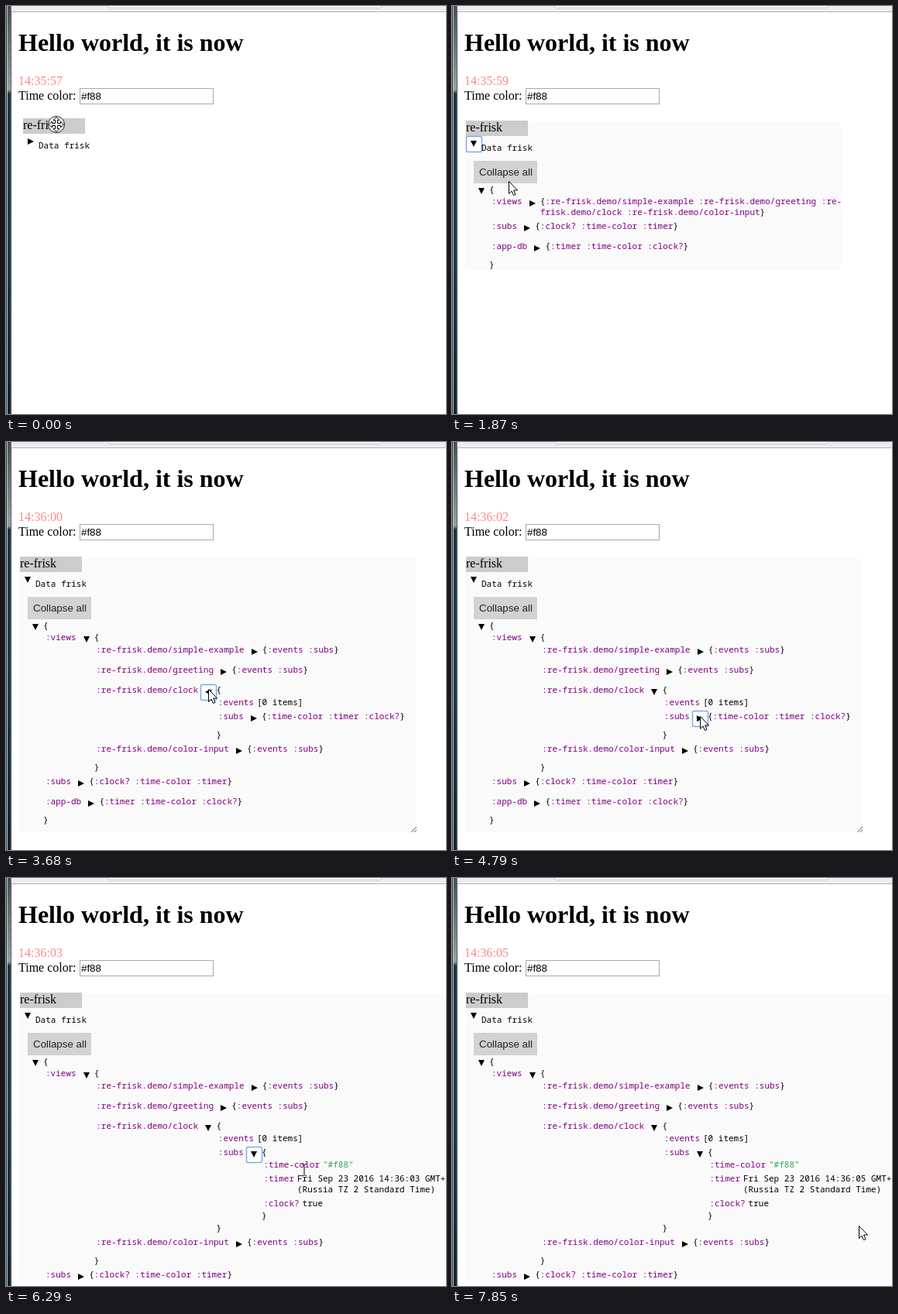
An HTML page that plays this animation: 568x527 px, repeating every 8 s.

```html
<!DOCTYPE html>
<html lang="en">
<head>
<meta charset="utf-8">
<title>Data inspector</title>
<style>
  html, body { margin: 0; width: 100%; height: 100%; overflow: hidden; background: #fff; }
  svg { display: block; }
  text { white-space: pre; }
  .mono { font: 11px "Noto Sans Mono", "DejaVu Sans Mono", monospace; }
  .serif { font: 16px "Liberation Serif", "Times New Roman", serif; }
  .head { font: bold 32px "Liberation Serif", "Times New Roman", serif; }
  .sans { font: 13.33px "Liberation Sans", Arial, sans-serif; }
  .key { fill: #800080; }
  .str { fill: #2fa350; }
</style>
</head>
<body>
<svg width="568" height="527" viewBox="0 0 568 527">
  <defs>
    <linearGradient id="edge" x1="0" y1="0" x2="0" y2="1">
      <stop offset="0" stop-color="#4d4f51"/>
      <stop offset=".1" stop-color="#6f7376"/>
      <stop offset=".205" stop-color="#9a9ea0"/>
      <stop offset=".215" stop-color="#20343d"/>
      <stop offset=".55" stop-color="#203c49"/>
      <stop offset="1" stop-color="#16242c"/>
    </linearGradient>
  </defs>
  <rect x="7" width="561" height="7" fill="#ededed"/>
  <rect x="7" y="7" width="561" height="1" fill="#b4b4b4"/>
  <rect x="132.5" y="-6.5" width="352" height="9" rx="2" fill="#fff" stroke="#c4c4c4"/>
  <rect width="7" height="527" fill="url(#edge)"/>
  <rect width="1" height="527" fill="#20343d"/>
  <rect x="1" width="1" height="527" fill="#c8ced1"/>
  <rect x="6" width="1" height="527" fill="#5d7079"/>
  <rect x="7" y="8" width="1" height="519" fill="#d5dde0"/>
  <g id="panel"></g>
  <text class="head" x="16" y="58">Hello world, it is now</text>
  <text class="serif" id="clock" x="16" y="102" fill="#f88"></text>
  <text class="serif" x="16" y="121">Time color:</text>
  <rect x="95.5" y="106.5" width="172" height="20" fill="#fff" stroke="#a9a9a9"/>
  <text class="sans" x="97" y="121">#f88</text>
  <g id="tree"></g>
  <g id="cursor"></g>
</svg>
<script>
const LOOP = 8000, CW = 6.6, SPIN = 200;
const el = id => document.getElementById(id);

// Screen refreshes: [first, last, count], evenly spread.
const ticks = [0];
for (const [a, b, n] of [[120, 1060, 8], [1210, 2170, 8], [2330, 2480, 2], [2760, 3680, 8],
  [3830, 4790, 8], [4910, 5900, 8], [6020, 6290, 3], [6430, 7010, 5], [7170, 7850, 6]])
  for (let i = 0; i < n; i++) ticks.push(a + (b - a) * i / (n - 1));

// Click time of each expander.
const click = { data: 1000, views: 2290, clock: 3552, subs: 4788 };
const BLUR = 7300;

// Pointer path: time, x, y, shape.
const path = [
  [0, 65, 153, 'move'], [120, 65, 153, 'move'], [390, 61, 156, 'move'],
  [600, 50, 160, 'arrow'], [920, 22, 180, 'arrow'], [1260, 22, 180, 'arrow'],
  [1620, 60, 216, 'arrow'], [2100, 106, 251, 'arrow'], [2760, 106, 251, 'arrow'],
  [3150, 190, 290, 'arrow'], [3540, 261, 319, 'arrow'], [3900, 261, 319, 'arrow'],
  [4500, 318, 350, 'arrow'], [4700, 320, 354, 'arrow'], [4950, 320, 354, 'arrow'],
  [5250, 352, 366, 'beam'], [5600, 385, 377, 'beam'], [6400, 385, 377, 'beam'],
  [6570, 430, 392, 'beam'], [6720, 490, 406, 'arrow'], [7010, 523, 411, 'arrow'],
  [7170, 528, 424, 'arrow'], [7450, 533, 448, 'arrow'], [7700, 525, 449, 'arrow'],
  [LOOP, 525, 449, 'arrow']];

const shapes = {
  arrow: '<path d="M.5 .5V16.5L4 13L6.5 18.5L9 17.5L6.6 12H11.5Z" fill="#fff" stroke="#000"/>',
  beam: '<path d="M-3 -7.5H-1L0 -6.5L1 -7.5H3M0 -6.5V6.5M-3 7.5H-1L0 6.5L1 7.5H3" fill="none" stroke="#000"/>',
  move: '<circle r="10.5" fill="#fff" stroke="#222"/>' + [0, 90, 180, 270].map(a =>
    `<path transform="rotate(${a})" d="M-1.5 -1.5V-5.5H-4L0 -9.5L4 -5.5H1.5V-1.5" fill="#fff" stroke="#000"/>`).join('')
};

const NS = 're-frisk.demo/', EV = ['events', 'subs'];
const view = (name, more) => ({ key: NS + name, keys: EV, ...more });
const clockText = t => {
  const s = 57 + Math.floor((t + 280) / 1000);
  return `14:${35 + Math.floor(s / 60)}:${String(s % 60).padStart(2, '0')}`;
};

const model = time => [
  {
    key: 'views', id: 'views',
    lines: [`{:${NS}simple-example :${NS}greeting :re-`, 'frisk.demo/clock :' + NS + 'color-input}'],
    kids: [view('simple-example'), view('greeting'), view('clock', {
      id: 'clock',
      kids: [
        { key: 'events', value: ['[0 items]'] },
        {
          key: 'subs', id: 'subs', keys: ['time-color', 'timer', 'clock?'],
          kids: [
            { key: 'time-color', value: ['"#f88"'], cls: 'str' },
            { key: 'timer', value: [`Fri Sep 23 2016 ${time} GMT+0300`, '(Russia TZ 2 Standard Time)'] },
            { key: 'clock?', value: ['true'] }]
        }]
    }), view('color-input')]
  },
  { key: 'subs', keys: ['clock?', 'time-color', 'timer'] },
  { key: 'app-db', keys: ['timer', 'time-color', 'clock?'] }
];

const text = (s, x, y, cls = '') => `<text class="mono ${cls}" x="${x}" y="${y}">${s}</text>`;
const keys = (s, x, y) => text(s.replace(/[{}]/g, '<tspan fill="#000">$&</tspan>'), x, y, 'key');
const isOpen = (id, t) => id && t >= click[id] + 25;

function focused(t) {
  if (t >= BLUR) return null;
  return Object.keys(click).filter(k => t >= click[k]).pop();
}

function expander(x, y, id, t) {
  const turn = id ? Math.min(1, Math.max(0, (t - click[id]) / SPIN)) * -270 : 0;
  const ring = id && focused(t) === id
    ? `<rect x="${x - 9.5}" y="${y - 9.5}" width="20" height="20" rx="2" fill="#fff" stroke="#7daaea" stroke-width="1.5"/>` : '';
  return ring + `<path d="M-4 -4L4 0L-4 4Z" transform="translate(${x} ${y}) rotate(${turn})"/>`;
}

// Lays out a list of entries; returns markup and the baseline of the closing brace.
function layout(list, x, y, t) {
  let out = '', gap = 0;
  for (const n of list) {
    const label = ':' + n.key, end = x + label.length * CW;
    out += text(label, x, y, 'key');
    if (n.value) {
      n.value.forEach((s, i) => out += text(s, end + 4, y + 14 * i, n.cls));
      gap = 18 + 14 * (n.value.length - 1);
    } else {
      const bx = end + 23.2;
      out += expander(Math.floor(end + 13.5), y - 1, n.id, t);
      if (isOpen(n.id, t)) {
        const sub = layout(n.kids, bx + 2.4, y + 16, t);
        out += text('{', bx, y) + sub.out + text('}', bx, sub.y);
        gap = sub.y - y + 18;
      } else {
        const lines = n.lines || ['{' + n.keys.map(k => ':' + k).join(' ') + '}'];
        lines.forEach((s, i) => out += keys(s, bx, y + 14 * i));
        gap = lines.length > 1 ? 32 : 26;
      }
    }
    y += gap;
  }
  return { out, y: y - 2 };
}

function drawPanel(t) {
  if (!isOpen('data', t)) return '';
  const [r, b, grip] = isOpen('subs', t) ? [568, 520, 0] : isOpen('clock', t) ? [530, 504, 530]
    : isOpen('views', t) ? [502, 454, 443] : [502, 340, 0];
  return `<rect x="17" y="151" width="${r - 17}" height="${b - 151}" fill="#fafafa"/>` +
    (grip ? `<path d="M${grip - 7} ${b}l7 -7m-3 7l3 -3" stroke="#666" fill="none"/>` : '');
}

function drawTree(t) {
  const k = 1 - Math.min(1, Math.max(0, (t - 120) / 270));
  let out = `<g transform="translate(${4 * k} ${-3 * k})">` +
    '<rect x="18" y="148" width="80" height="20" fill="#ccc"/>' +
    '<text class="serif" x="18" y="162">re-frisk</text>' +
    expander(28, 178, 'data', t) + text('Data frisk', 38, 187) + '</g>';
  if (isOpen('data', t)) {
    const body = layout(model(clockText(t)), 51, 256, t);
    out += '<rect x="28" y="200" width="82" height="29" fill="#d2d2d2"/>' +
      '<text class="sans" x="35" y="219" fill="#222">Collapse all</text>' +
      '<path d="M34 235H42L38 243Z"/>' + text('{', 48, 241) + body.out + text('}', 48, body.y);
  }
  return out;
}

function drawCursor(t) {
  const i = Math.max(1, path.findIndex(p => p[0] > t));
  const [t0, x0, y0, shape] = path[i - 1], [t1, x1, y1] = path[i];
  const f = (t - t0) / (t1 - t0);
  const x = Math.round(x0 + (x1 - x0) * f), y = Math.round(y0 + (y1 - y0) * f);
  return `<g transform="translate(${x} ${y})">${shapes[shape]}</g>`;
}

let shown = -1;
function frame(now) {
  const t = now % LOOP;
  const tick = ticks.filter(s => s <= t + 0.5).pop();
  if (tick !== shown) {
    shown = tick;
    el('panel').innerHTML = drawPanel(tick);
    el('tree').innerHTML = drawTree(tick);
    el('clock').textContent = clockText(tick);
    el('cursor').innerHTML = drawCursor(tick);
  }
}

const start = performance.now();
function loop() {
  frame(performance.now() - start);
  requestAnimationFrame(loop);
}
loop();
</script>
</body>
</html>
```
